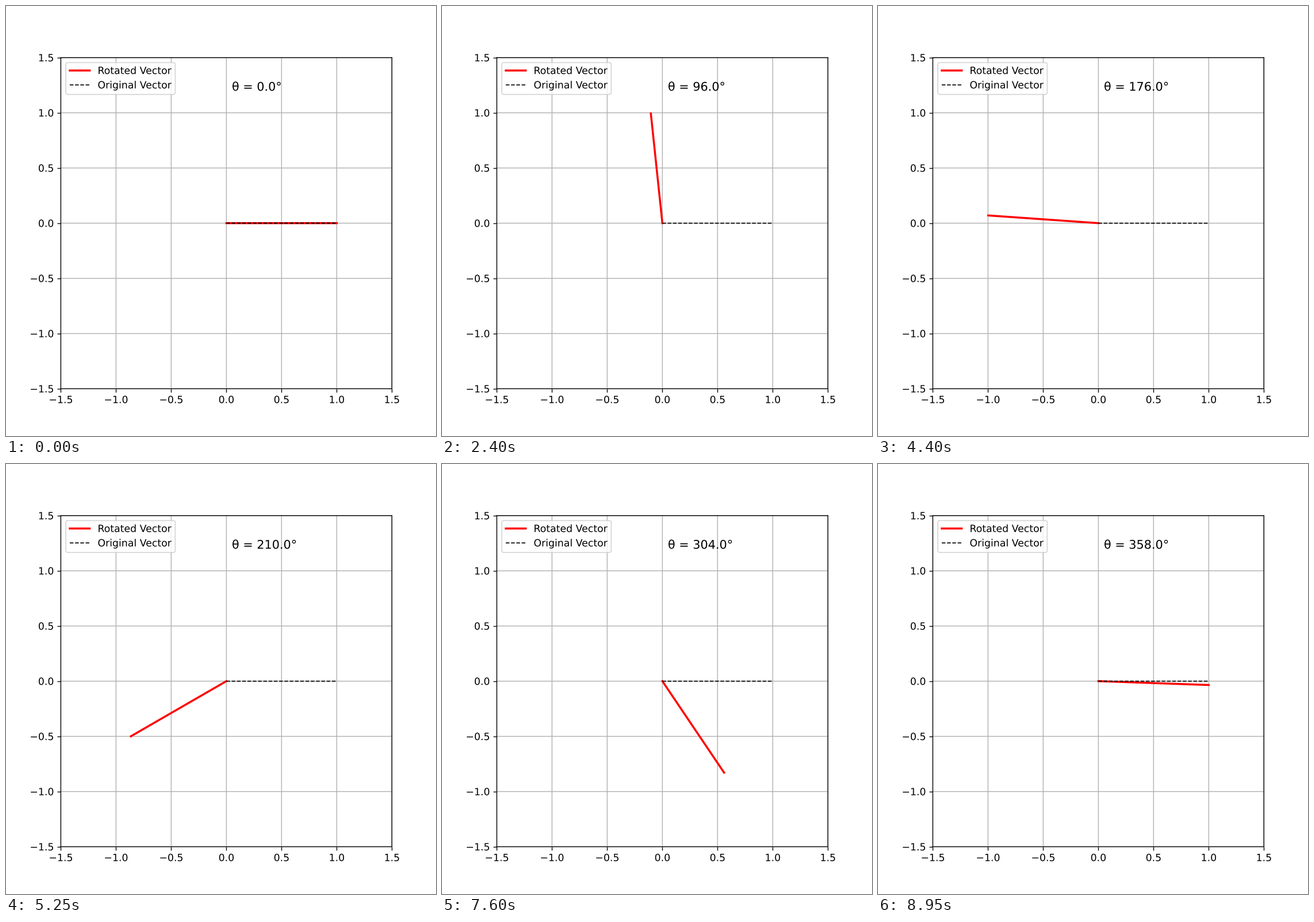
A matplotlib script for the animation above (9000 ms loop, 748 by 748 pixels).

```python
import numpy as np
import matplotlib.pyplot as plt
from matplotlib.animation import FuncAnimation
from matplotlib.patheffects import Normal

STAGE = 748
FRAMES = 180
INTERVAL = 50
STEP = 360 / FRAMES

# Keep lines and glyphs at their true sub-pixel positions.
plt.rcParams.update({
    "font.family": "DejaVu Sans",
    "text.hinting": "none",
    "path.snap": False,
    "path.effects": [Normal()],
})

fig, ax = plt.subplots(figsize=(6, 6), dpi=STAGE / 6)
ax.set_xlim(-1.5, 1.5)
ax.set_ylim(-1.5, 1.5)
ax.set_aspect("equal")
ax.grid(True)

vector, = ax.plot([0, 1], [0, 0], "r-", lw=2, label="Rotated Vector")
ax.plot([0, 1], [0, 0], "k--", lw=1, label="Original Vector")
label = ax.text(0.05, 1.2, "", fontsize=12)
ax.legend(loc="upper left")


def update(i):
    deg = i * STEP
    rad = np.radians(deg)
    vector.set_data([0, np.cos(rad)], [0, np.sin(rad)])
    label.set_text(f"θ = {deg:.1f}°")
    return vector, label


anim = FuncAnimation(fig, update, frames=FRAMES, interval=INTERVAL,
                     init_func=lambda: update(0), repeat=True, repeat_delay=0)
plt.show()
```
